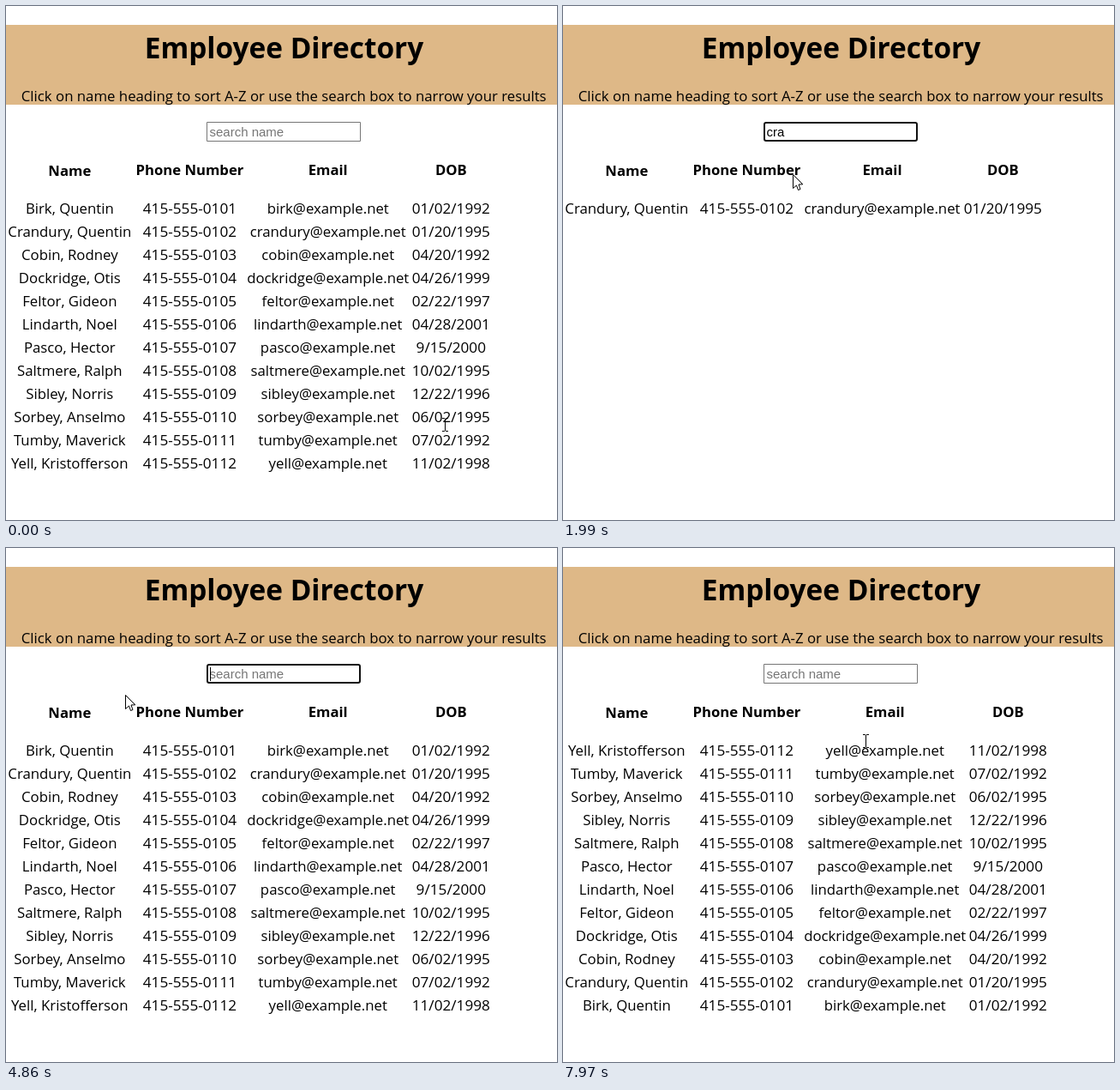
Recreate the animation shown at these times as an HTML page with a canvas. Size 643x599 px, loop 8 s.

```html
<!DOCTYPE html>
<html lang="en">
<head>
<meta charset="utf-8">
<title>Employee Directory</title>
<style>
  html, body { margin: 0; width: 100%; height: 100%; overflow: hidden; background: #fff; }
  canvas { display: block; }
</style>
</head>
<body>
<canvas id="stage" width="643" height="599"></canvas>
<script>
const ctx = document.getElementById('stage').getContext('2d');
const LOOP = 8000;
const SANS = '"Open Sans", "Noto Sans", sans-serif';
const TITLE = `bold 33.4px ${SANS}`;
const HEADING = `bold 16.7px ${SANS}`;
const BODY = `16.8px ${SANS}`;
const DIGITS = `17.2px ${SANS}`;
const FIELD = '15px "Liberation Sans", Arial, sans-serif';

const people = [
  ['Birk, Quentin', '01/02/1992'],
  ['Crandury, Quentin', '01/20/1995'],
  ['Cobin, Rodney', '04/20/1992'],
  ['Dockridge, Otis', '04/26/1999'],
  ['Feltor, Gideon', '02/22/1997'],
  ['Lindarth, Noel', '04/28/2001'],
  ['Pasco, Hector', '9/15/2000'],
  ['Saltmere, Ralph', '10/02/1995'],
  ['Sibley, Norris', '12/22/1996'],
  ['Sorbey, Anselmo', '06/02/1995'],
  ['Tumby, Maverick', '07/02/1992'],
  ['Yell, Kristofferson', '11/02/1998']
].map(([name, dob], i) => ({
  name, dob,
  phone: `415-555-${String(101 + i).padStart(4, '0')}`,
  email: `${name.split(',')[0].toLowerCase()}@example.net`
}));

const FOCUS = 760, BLUR = 6090, SORT = 6170;
const BLINK = 530, BLINK_START = 2450, TYPING_END = 1910;
const queries = [[910, 'c'], [1060, 'cr'], [1140, 'cra'], [3070, 'cr'], [3320, 'c'], [3770, '']];

// The pointer runs along each path at an even pace, then rests at its end.
const moves = [
  { start: 70, steps: 10, path: [[512, 488], [265, 151]] },
  { start: 1450, steps: 10, path: [[265, 151], [240, 190], [230, 222], [245, 222], [268, 196], [299, 144]] },
  { start: 4550, steps: 11, path: [[299, 144], [155, 166], [110, 180], [100, 190]] },
  { start: 5400, steps: 4, path: [[100, 190], [81, 194]] },
  { start: 7270, steps: 4, path: [[81, 194], [358, 271]] },
  { start: 7660, steps: 2, path: [[358, 271], [364, 287]] },
  { start: 7890, steps: 2, path: [[364, 287], [353, 225]] }
];

function pointer(t) {
  const { start, steps, path } = moves.findLast(m => t >= m.start) || moves[0];
  const step = t < start ? 0 : Math.min(steps, Math.floor((t - start + 5) / 76.7) + 1);
  const along = step / steps * (path.length - 1);
  const i = Math.min(Math.floor(along), path.length - 2);
  return path[i].map((v, axis) => v + (path[i + 1][axis] - v) * (along - i));
}

function overText(x, y) {
  const inside = (left, top, right, bottom) => x > left && x < right && y > top && y < bottom;
  return inside(234, 135, 414, 158) || inside(50, 183, 98, 205) || inside(0, 224, 565, 546);
}

// Every keystroke narrows what is already listed; clearing the field restores it all.
function search(t) {
  let query = '', rows = people;
  for (const [time, value] of queries) {
    if (t < time) break;
    query = value;
    rows = value ? rows.filter(p => p.name.toLowerCase().includes(value)) : people;
  }
  return { query, rows: t >= SORT ? [...rows].reverse() : rows };
}

function text(str, x, y, font, align = 'center', color = '#000') {
  ctx.font = font;
  ctx.textAlign = align;
  ctx.fillStyle = color;
  ctx.fillText(str, x, y);
}

function drawBanner() {
  ctx.fillStyle = '#deb887';
  ctx.fillRect(0, 22, 643, 93);
  text('Employee Directory', 324.5, 61, TITLE);
  text('Click on name heading to sort A-Z or use the search box to narrow your results', 324.2, 111, BODY);
}

function drawField(t, query) {
  const focused = t >= FOCUS && t < BLUR;
  ctx.beginPath();
  if (focused) ctx.roundRect(235, 136, 178, 21, 2);
  else ctx.rect(234.5, 135.5, 179, 22);
  ctx.lineWidth = focused ? 2 : 1;
  ctx.strokeStyle = focused ? '#101010' : '#767676';
  ctx.stroke();
  text(query || 'search name', 237.5, 152, FIELD, 'left', query ? '#000' : '#757575');

  const lit = t < TYPING_END || Math.floor((t - BLINK_START) / BLINK) % 2 === 0;
  if (focused && lit) {
    ctx.fillStyle = '#000';
    ctx.fillRect(Math.floor(238 + ctx.measureText(query).width), 139, 1, 16);
  }
}

function drawTable(rows) {
  const single = rows.length === 1;
  const columns = [
    ['Name', 'name', 74.3, BODY],
    ['Phone Number', 'phone', 214.4, DIGITS],
    ['Email', 'email', single ? 372.5 : 375.7, BODY],
    ['DOB', 'dob', single ? 513.3 : 519.3, DIGITS]
  ];
  for (const [title, field, x, font] of columns) {
    text(title, x, field === 'name' ? 198 : 197, HEADING);
    rows.forEach((person, i) => text(person[field], x, 242 + 27 * i, font));
  }
}

function drawArrow(x, y) {
  ctx.beginPath();
  [[0, 0], [0, 16], [4, 12.5], [6, 18], [8.5, 17], [6.5, 11.5], [11.3, 11.3]]
    .forEach(([dx, dy]) => ctx.lineTo(x + 0.5 + dx, y + 0.5 + dy));
  ctx.closePath();
  ctx.fillStyle = '#fff';
  ctx.fill();
  ctx.lineWidth = 1;
  ctx.strokeStyle = '#000';
  ctx.stroke();
}

function drawBeam(x, y) {
  ctx.fillStyle = '#000';
  for (const edge of [y - 8, y + 7]) {
    ctx.fillRect(x - 3, edge, 3, 1);
    ctx.fillRect(x + 1, edge, 3, 1);
  }
  ctx.fillRect(x, y - 7, 1, 14);
}

function drawClick(x, y) {
  ctx.beginPath();
  ctx.arc(x, y, 15, 0, Math.PI * 2);
  ctx.fillStyle = 'rgba(255, 245, 0, 0.65)';
  ctx.fill();
}

function draw(t) {
  ctx.fillStyle = '#fff';
  ctx.fillRect(0, 0, 643, 599);
  const { query, rows } = search(t);
  drawBanner();
  drawField(t, query);
  drawTable(rows);

  const [x, y] = pointer(t).map(Math.round);
  if (t >= BLUR && t < SORT) drawClick(x - 1, y);
  (overText(x, y) ? drawBeam : drawArrow)(x, y);
}

let began;
function tick(now) {
  began ??= now;
  draw((now - began) % LOOP);
  requestAnimationFrame(tick);
}
draw(0);
requestAnimationFrame(tick);
</script>
</body>
</html>
```
